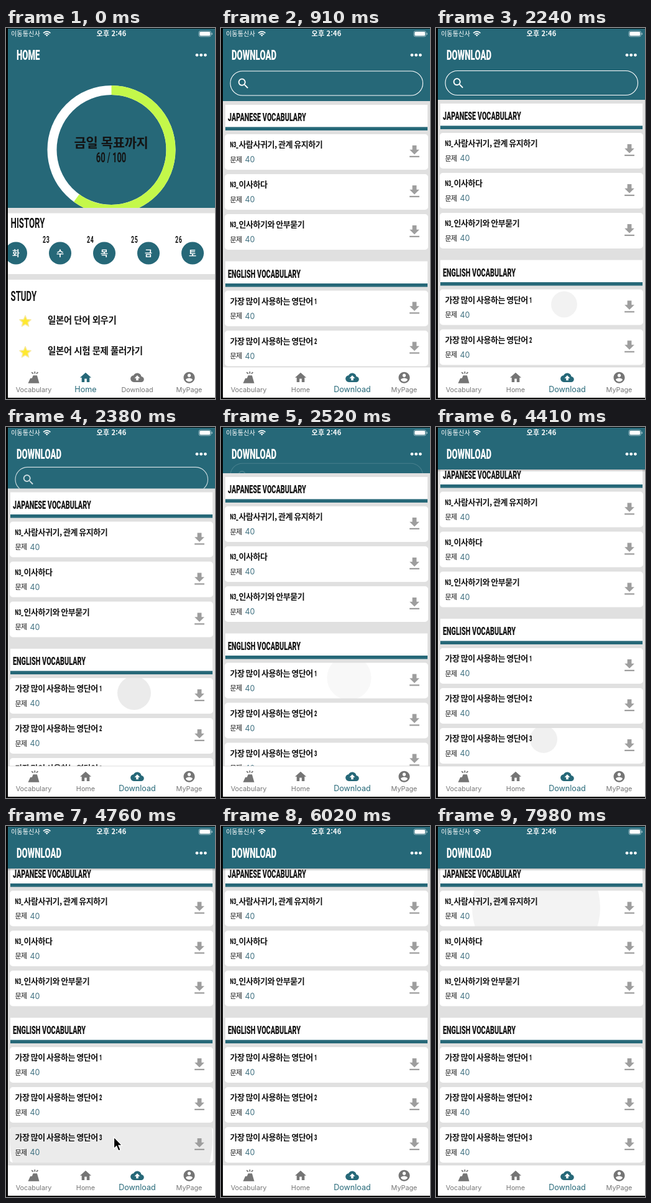
Recreate the animation shown at these times as an HTML page. Size 336 by 594 pixels, loop 8000 ms.

```html
<!DOCTYPE html>
<html lang="ko">
<head>
<meta charset="utf-8">
<title>Vocabulary app</title>
<style>
  html, body { margin: 0; width: 100%; height: 100%; overflow: hidden; background: #000; }
  svg { display: block; width: 336px; height: 594px; }
  text { font-family: "Noto Sans CJK KR", "Noto Sans CJK", sans-serif; fill: #141414; white-space: pre; }
  .cond { font-family: Roboto, sans-serif; font-weight: 800; }
  .title { font-size: 22.5px; fill: #fff; }
  .section { font-size: 22.5px; font-weight: 700; }
  .group { font-size: 18.3px; }
  .date { font-size: 15px; font-weight: 700; letter-spacing: 1px; }
  .score { font-size: 22px; font-weight: 700; }
  .prefix { font-size: 13px; }
  .goal { font-size: 21px; font-weight: 700; letter-spacing: -.4px; }
  .day { font-size: 13px; font-weight: 700; fill: #fff; }
  .task { font-size: 14.5px; font-weight: 700; letter-spacing: -.45px; }
  .word { font-size: 13px; font-weight: 700; letter-spacing: -.45px; word-spacing: -1px; }
  .label { font-size: 11px; letter-spacing: -.5px; }
  .count { font: 12.5px Inter, sans-serif; fill: #3f7080; }
  .tab { font: 10.8px Inter, sans-serif; fill: #757575; }
  .tab.on { font-size: 12.6px; fill: #266878; }
  .carrier { font-size: 10.2px; fill: #fff; }
  .clock { font-size: 11px; font-weight: 700; letter-spacing: .2px; fill: #fff; }
</style>
</head>
<body>
<script>
const TEAL = '#266878', GREY = '#e0e0e0', STEP = 70, LOOP = 8000;
const NARROW = .59; // proportion of the condensed display face
const ICONS = {
  home: 'M10 20v-6h4v6h5v-8h3L12 3 2 12h3v8z',
  cloud: 'M19.35 10.04C18.67 6.59 15.64 4 12 4 9.11 4 6.6 5.64 5.35 8.04 2.34 8.36 0 10.91 0 14c0 3.31 2.69 6 6 6h13c2.76 0 5-2.24 5-5 0-2.64-2.05-4.78-4.65-4.96zM14 13v4h-4v-4H7l5-5 5 5h-3z',
  person: 'M12 2C6.48 2 2 6.48 2 12s4.48 10 10 10 10-4.48 10-10S17.52 2 12 2zm0 3c1.66 0 3 1.34 3 3s-1.34 3-3 3-3-1.34-3-3 1.34-3 3-3zm0 14.2c-2.5 0-4.71-1.28-6-3.22.03-1.99 4-3.08 6-3.08 1.99 0 5.97 1.09 6 3.08-1.29 1.94-3.5 3.22-6 3.22z',
  volcano: 'M18 8h-7l-2 5H6l-4 9h20zM13 1h2v4h-2zM16.1 4.5l2.8-2.9 1.5 1.5-2.9 2.8zM7.6 3.1l1.5-1.5 2.8 2.9-1.4 1.4z',
  save: 'M19 9h-4V3H9v6H5l7 7 7-7zM5 18v2h14v-2H5z',
  search: 'M15.5 14h-.79l-.28-.27C15.41 12.59 16 11.11 16 9.5 16 5.91 13.09 3 9.5 3S3 5.91 3 9.5 5.91 16 9.5 16c1.61 0 3.09-.59 4.23-1.57l.27.28v.79l5 4.99L20.49 19l-4.99-5zm-6 0C7.01 14 5 11.99 5 9.5S7.01 5 9.5 5 14 7.01 14 9.5 11.99 14 9.5 14z'
};

function el(parent, tag, attrs = {}, content) {
  const node = document.createElementNS('http://www.w3.org/2000/svg', tag);
  for (const key in attrs) node.setAttribute(key, attrs[key]);
  if (content) node.textContent = content;
  return parent.appendChild(node);
}
const rect = (p, x, y, width, height, fill, rx = 0) => el(p, 'rect', { x, y, width, height, fill, rx });
const text = (p, x, y, cls, str, anchor = 'start') =>
  el(p, 'text', { x, y, class: cls, 'text-anchor': anchor }, str);
const display = (p, x, y, cls, str, anchor = 'start') =>
  el(p, 'text', { class: 'cond ' + cls, 'text-anchor': anchor, transform: `translate(${x} ${y}) scale(${NARROW} 1)` }, str);
const circle = (p, cx, cy, r, fill) => el(p, 'circle', { cx, cy, r, fill });
const icon = (p, name, x, y, size, fill) =>
  el(p, 'path', { d: ICONS[name], fill, transform: `translate(${x} ${y}) scale(${size / 24})` });

const svg = el(document.body, 'svg', { viewBox: '0 0 336 594' });
const defs = el(svg, 'defs');
const clip = (id, x, y, w, h, rx) => rect(el(defs, 'clipPath', { id }), x, y, w, h, '#000', rx);
clip('screen', 3, 1, 333, 591);
clip('hero', 3, 1, 333, 287);
clip('card', 0, 0, 327, 57, 5);
const headerClip = clip('header', 3, 1, 333, 116);
const shade = el(defs, 'linearGradient', { id: 'shade', x2: 0, y2: 1 });
el(shade, 'stop', { 'stop-opacity': .28 });
el(shade, 'stop', { offset: 1, 'stop-opacity': 0 });

const screen = el(svg, 'g', { 'clip-path': 'url(#screen)' });
const home = el(screen, 'g'), download = el(screen, 'g');

function tabs(page, active) {
  rect(page, 3, 543, 333, 49, '#fff');
  [['Vocabulary', 'volcano', 44.5], ['Home', 'home', 128], ['Download', 'cloud', 211], ['MyPage', 'person', 294.5]]
    .forEach(([name, glyph, x]) => {
      const on = name === active;
      icon(page, glyph, x - 10.8, 549, 21.6, on ? TEAL : '#757575');
      text(page, x, on ? 582.5 : 583, on ? 'tab on' : 'tab', name, 'middle');
    });
}

function buildHome() {
  rect(home, 3, 1, 333, 591, '#fff');
  rect(home, 3, 1, 333, 287, TEAL);
  display(home, 17, 50.5, 'title', 'HOME');
  const hero = el(home, 'g', { 'clip-path': 'url(#hero)' });
  const ring = { cx: 169.5, cy: 195, r: 95.5, fill: 'none', 'stroke-width': 15 };
  el(hero, 'circle', { ...ring, stroke: '#fff' });
  el(hero, 'circle', { ...ring, stroke: '#c4f84a', pathLength: 100, 'stroke-dasharray': '60 40', transform: 'rotate(-90 169.5 195)' });
  text(home, 169, 191, 'goal', '금일 목표까지', 'middle');
  display(home, 169, 215, 'score', '60 / 100', 'middle');

  rect(home, 3, 288, 333, 8.5, GREY);
  rect(home, 3, 394, 333, 9, GREY);
  display(home, 7.5, 320, 'section', 'HISTORY');
  display(home, 7.5, 437, 'section', 'STUDY');
  [...'화수목금토'].forEach((day, i) => {
    const x = 16 + 71 * i;
    if (i) display(home, x - 28, 344, 'date', String(22 + i));
    circle(home, x, 360.5, 18, TEAL);
    text(home, x, 364.5, 'day', day, 'middle');
  });
  const star = Array.from({ length: 10 }, (_, i) => {
    const a = Math.PI * i / 5, r = i % 2 ? 4.4 : 9.5;
    return `${r * Math.sin(a)},${-r * Math.cos(a)}`;
  }).join(' ');
  ['일본어 단어 외우기', '일본어 시험 문제 풀러가기'].forEach((task, i) => {
    const y = 470 + 49.5 * i;
    el(home, 'polygon', { points: star, transform: `translate(31 ${y})`, fill: '#ffe92e', stroke: '#f7e9a0', 'stroke-width': 1.5, 'stroke-linejoin': 'round' });
    text(home, 67, y + 2.5, 'task', task);
  });
  tabs(home, 'Home');
}

const cards = [];
let list, searchBox, headerFill, shadow;

function addGroup(y, name, prefix, items) {
  rect(list, 7, y, 325, 36, '#fff');
  rect(list, 7, y + 35.5, 325, 5.5, TEAL);
  display(list, 11, y + 26, 'group', name);
  items.forEach((item, i) => {
    const card = el(list, 'g', { transform: `translate(6 ${y + 47 + 64 * i})` });
    rect(card, 0, 0, 327, 57, '#fff', 5);
    const ink = circle(el(card, 'g', { 'clip-path': 'url(#card)' }), 0, 0, 0, '#000');
    text(card, prefix ? 22.5 : 8.5, 21, 'word', item);
    display(card, prefix ? 8.5 : 144, 21, 'prefix', prefix || String(i + 1));
    text(card, 8.5, 44.5, 'label', '문제');
    text(card, 32.5, 45, 'count', '40');
    icon(card, 'save', 291.5, 14.5, 27, '#9e9e9e');
    cards.push(ink);
  });
}

function buildDownload() {
  rect(download, 3, 1, 333, 591, GREY);
  list = el(download, 'g');
  addGroup(123, 'JAPANESE VOCABULARY', 'N3_', ['사람사귀기, 관계 유지하기', '이사하다', '인사하기와 안부묻기']);
  addGroup(373.5, 'ENGLISH VOCABULARY', '', Array(3).fill('가장 많이 사용하는 영단어'));
  headerFill = rect(download, 3, 1, 333, 116, TEAL);
  shadow = rect(download, 3, 68, 333, 4, 'url(#shade)');
  searchBox = el(el(download, 'g', { 'clip-path': 'url(#header)' }), 'g');
  el(searchBox, 'rect', { x: 15, y: 69, width: 309.5, height: 39, rx: 19.5, fill: 'none', stroke: '#fff', 'stroke-width': 1.1 });
  icon(searchBox, 'search', 25, 78, 22, '#fff');
  display(download, 17, 50.5, 'title', 'DOWNLOAD');
  tabs(download, 'Download');
  rect(download, 3, 542.5, 333, .8, '#d6d6d6');
}

function buildChrome() {
  text(screen, 8, 13, 'carrier', '이동통신사');
  text(screen, 169.5, 13.2, 'clock', '오후 2:46', 'middle');
  el(screen, 'path', { d: 'M60 8.2Q65.7 3 71.4 8.2M62.2 10.4Q65.7 7.2 69.2 10.4', fill: 'none', stroke: '#fff', 'stroke-width': 1.7 });
  el(screen, 'path', { d: 'M63.8 11.5Q65.7 10 67.6 11.5L65.7 13.6z', fill: '#fff' });
  el(screen, 'rect', { x: 310, y: 4.8, width: 19.5, height: 9, rx: 2.6, fill: 'none', stroke: '#a3c0c8', 'stroke-width': .9 });
  rect(screen, 311.3, 6.1, 16.9, 6.4, '#fff', 1.5);
  rect(screen, 330.6, 7.6, 1.3, 3.4, '#a3c0c8', .6);
  [307, 313.7, 320.4].forEach(x => circle(screen, x, 43.3, 2.4, '#fff'));
}

buildHome();
buildDownload();
buildChrome();
const cursor = el(screen, 'path', {
  d: 'M0 0V18.5L4.2 14.6 7.3 22 10.6 20.6 7.5 13.4H13z',
  fill: '#000', stroke: '#fff', 'stroke-width': 1.2
});

// Each row: time, value(s)
const SCROLL = [[2170, 0], [2240, 2], [2310, 8], [2380, 18.5], [2450, 31], [2520, 43], [2590, 53], [2660, 61], [2730, 66.5]];
// Ripples: card index, then rows of time, x, y, radius, opacity
const RIPPLES = [
  [3, [[2240, 200, 24, 21, .05], [2380, 200, 24, 27, .08], [2590, 200, 24, 40, 0]]],
  [5, [[4410, 167, 18, 22, .06], [4480, 167, 18, 50, .08], [4760, 163, 18, 163, .08], [4829, 163, 18, 170, .08]]],
  [0, [[7910, 155, 26, 62, .025], [7980, 155, 27, 103, .047]]]
];
const CURSORS = [[4760, 5040, 173.5, 498], [5810, 5880, 199, 379], [6860, 7000, 208, 259]];

function sample(rows, t) {
  if (t <= rows[0][0]) return rows[0].slice(1);
  const i = rows.findIndex(row => row[0] > t);
  if (i < 0) return rows[rows.length - 1].slice(1);
  const a = rows[i - 1], b = rows[i], k = (t - a[0]) / (b[0] - a[0]);
  return a.slice(1).map((v, j) => v + (b[j + 1] - v) * k);
}
const show = (node, on) => node.setAttribute('display', on ? 'inline' : 'none');

function draw(time) {
  const t = Math.floor(time % LOOP / STEP) * STEP;
  show(home, t < 910);
  show(download, t >= 910);

  const [scroll] = sample(SCROLL, t);
  const shrink = Math.min(scroll, 49);
  list.setAttribute('transform', `translate(0 ${-scroll})`);
  headerFill.setAttribute('height', 116 - shrink);
  headerClip.setAttribute('height', 116 - shrink);
  searchBox.setAttribute('transform', `translate(0 ${-shrink / 4})`);
  searchBox.setAttribute('opacity', Math.min(1, (1 - shrink / 49) / .8));
  show(shadow, scroll > 49);

  for (const [index, rows] of RIPPLES) {
    const ink = cards[index], on = t >= rows[0][0] && t <= rows[rows.length - 1][0];
    show(ink, on);
    if (!on) continue;
    const values = sample(rows, t);
    ['cx', 'cy', 'r', 'opacity'].forEach((key, i) => ink.setAttribute(key, values[i]));
  }
  const spot = CURSORS.find(([from, to]) => t >= from && t < to);
  show(cursor, spot);
  if (spot) cursor.setAttribute('transform', `translate(${spot[2]} ${spot[3]})`);
}

const start = performance.now();
function tick() {
  draw(performance.now() - start);
  requestAnimationFrame(tick);
}
draw(0);
requestAnimationFrame(tick);
</script>
</body>
</html>
```
